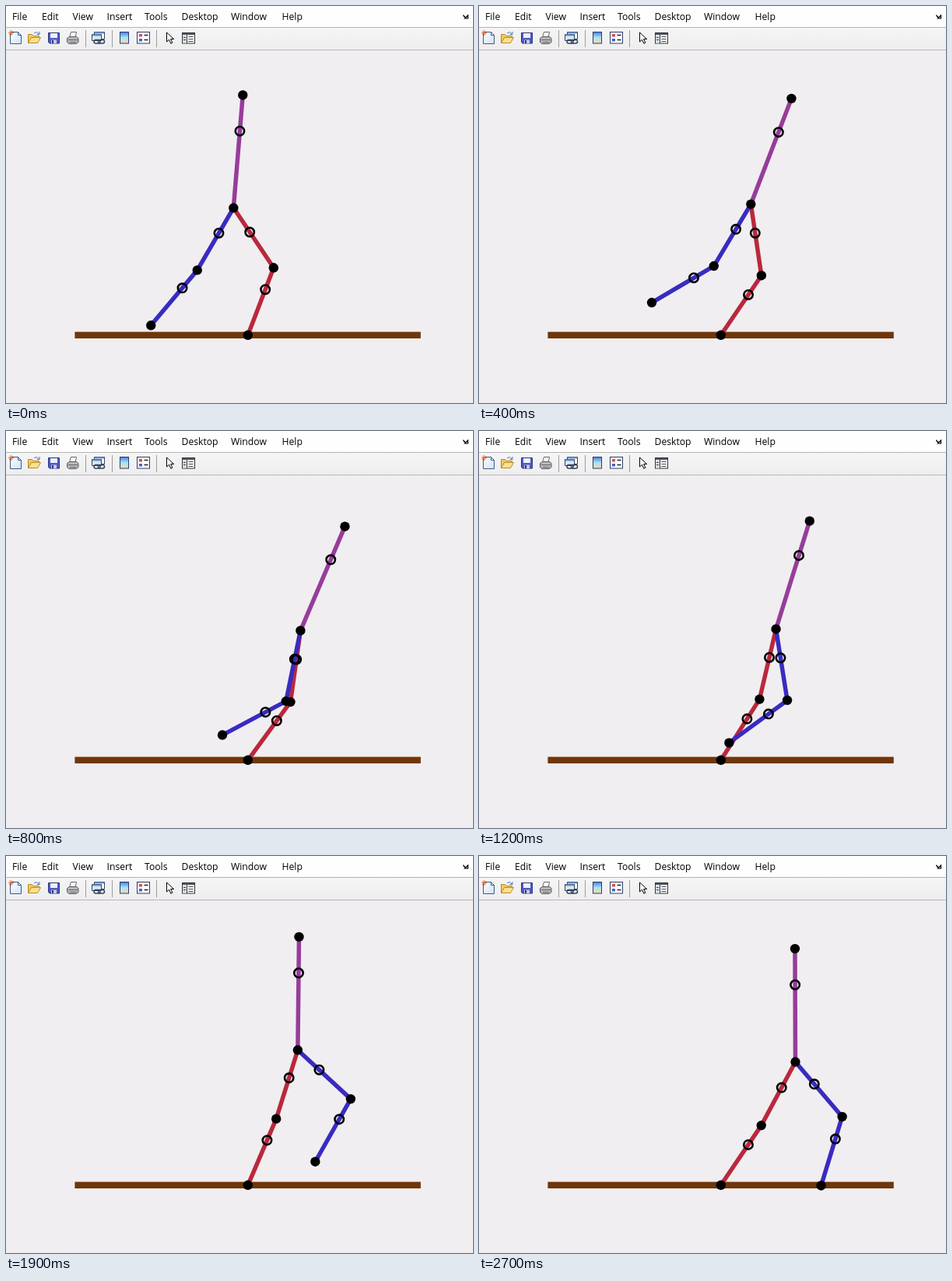
Write an HTML page that moves like this. It is 600x510 px and loops after 2.8 s.

```html
<!DOCTYPE html>
<html lang="en">
<head>
<meta charset="utf-8">
<title>Walking model</title>
<style>
html, body { margin: 0; width: 100%; height: 100%; overflow: hidden; background: #f0eef0; }
svg { display: block; width: 600px; height: 510px; }
text { font: 12.2px "Open Sans", "Noto Sans", sans-serif; fill: #000; }
</style>
</head>
<body>
<svg viewBox="0 0 600 510">
  <defs>
    <linearGradient id="page" x2="1" y2="1"><stop stop-color="#fff"/><stop offset="1" stop-color="#cfe2f5"/></linearGradient>
    <linearGradient id="bar" x2="0" y2="1"><stop stop-color="#4a7fe0"/><stop offset=".5" stop-color="#a9e4f5"/><stop offset="1" stop-color="#f5d8b0"/></linearGradient>
    <linearGradient id="strip" x2="0" y2="1"><stop stop-color="#f6f5f6"/><stop offset="1" stop-color="#efeeef"/></linearGradient>
  </defs>
  <rect width="600" height="510" fill="#f0eef0"/>
  <rect width="600" height="27" fill="#fefefe"/>
  <rect y="27" width="600" height="29" fill="url(#strip)"/>
  <path d="M0 27.500H600" stroke="#b4b3b4"/>
  <path d="M0 56.500H600" stroke="#b9b8b9"/>
  <g id="menu"></g>
  <path d="M587.500 11.500q1 3 4 3.500M593.500 12v4h-4z" fill="none" stroke="#000" stroke-width="1.200"/>

  <g id="tools" fill="none" stroke-width="1">
    <path d="M102.500 31v22M136.500 31v22M193.500 31v22" stroke="#9c9c9c"/>
    <path d="M5.500 33.500h10l4 4v11h-14z" fill="url(#page)" stroke="#3c5c84"/>
    <path d="M15.500 33.500v4h4" stroke="#3c5c84"/>
    <path d="M6.500 31v7M3 34.500h7M4 32l5 5M9 32l-5 5" stroke="#e8703a"/>
    <path d="M28.500 47.500v-11h5l2 2h7v3" fill="#f3c95b" stroke="#b58a2a"/>
    <path d="M28.500 47.500l4-7h12l-4 7z" fill="#fbe28c" stroke="#b58a2a"/>
    <path d="M36 35q4-3 6 1M43 33v3.500h-3.500" stroke="#4a78b8"/>
    <path d="M54.500 34.500h14v13.500h-12.500l-1.500-1.500z" fill="#5058c4" stroke="#2c347e"/>
    <path d="M57 35h9v6h-9z" fill="#eef1fb"/>
    <path d="M58 43.500h7v4.500h-7z" fill="#c8cce0"/>
    <path d="M59 44h2v4h-2z" fill="#2c347e"/>
    <path d="M81.500 40.500l2-7h7l-1.500 7z" fill="#fff" stroke="#666"/>
    <path d="M78.500 41.500l3-2h9l2.500 2v5l-3 2h-9l-2.500-2z" fill="#b8b8bc" stroke="#55555c"/>
    <path d="M80 43.500h12M82 46.500h8" stroke="#66666c"/>
    <path d="M113.500 33.500h13v9h-13z" fill="#fff" stroke="#34445c"/>
    <path d="M114 34.500h12" stroke="#6b93cc" stroke-width="2"/>
    <path d="M110.500 36.500h12v8h-12z" fill="#dce8f6" stroke="#34445c"/>
    <path d="M111 37.500h11" stroke="#6b93cc" stroke-width="2"/>
    <rect x="113" y="43.500" width="8" height="4.500" rx="2.200" stroke="#34445c" stroke-width="1.500"/>
    <rect x="118.500" y="43.500" width="8" height="4.500" rx="2.200" stroke="#34445c" stroke-width="1.500"/>
    <rect x="146.500" y="33.500" width="11" height="14.500" fill="url(#bar)" stroke="#2c3a68"/>
    <rect x="168.500" y="33.500" width="16" height="14.500" fill="#fff" stroke="#2c3a68"/>
    <path d="M171 36h4v3.500h-4z" fill="#d9534a"/>
    <path d="M171 42h4v3.500h-4z" fill="#4464c8"/>
    <path d="M177.500 37.500h5M177.500 43.500h5" stroke="#222" stroke-width="1.500"/>
    <path d="M206.500 34v12l3-2.800 2.300 5 2-1-2.200-4.700h4z" fill="#fff" stroke="#000"/>
    <rect x="226.500" y="34.500" width="16" height="13.500" fill="#fff" stroke="#333"/>
    <path d="M227 36h15" stroke="#4a5668" stroke-width="2"/>
    <path d="M227 37.500h5v10h-5z" fill="#d8dde4"/>
    <path d="M232.500 37v11" stroke="#333"/>
    <path d="M228 40.500h3M228 43.500h3M234.500 39.500h6M234.500 42.500h6M234.500 45.500h6" stroke="#444"/>
  </g>

  <rect x="88.400" y="418.600" width="444.400" height="8.400" fill="#703609"/>
  <g id="walker" stroke-width="5.500"></g>
</svg>
<script>
const LOOP = 2800, STEP = 100;
const LEG = 92.6, TORSO = 145.4, FOOT = [310.8, 422.8];
const RED = '#ba283d', BLUE = '#392bc0', PURPLE = '#973c9b';

// Joint angles in degrees from vertical at the key times (ms).
const times = [0, 400, 800, 1200, 1600, 2300, 2700];
const angles = {
  stanceShank: [20.9, 34.2, 36.2, 32.4, 26.4, 24.0, 34.1],
  stanceThigh: [-33.8, -8.4, 8.0, 13.2, 15.9, 20.7, 28.2],
  torso: [4.7, 21.0, 23.1, 17.3, 7.6, -4.2, -0.2],
  swingThigh: [-30.2, -30.9, -11.6, 9.0, 33.0, 53.8, 40.5],
  swingShank: [-40.0, -59.5, -62.0, -53.8, -40.1, -19.1, -17.0]
};

// Cubic spline with constant curvature in its end spans.
function spline(x, y) {
  const n = x.length - 1, m = x.map(() => 0);
  const h = i => x[i + 1] - x[i];
  const slope = i => (y[i + 1] - y[i]) / h(i);
  for (let pass = 0; pass < 80; pass++) {
    for (let i = 1; i < n; i++) {
      const r = 6 * (slope(i) - slope(i - 1));
      m[i] = (r - h(i - 1) * m[i - 1] - h(i) * m[i + 1]) / (2 * (h(i - 1) + h(i)));
    }
    m[0] = m[1];
    m[n] = m[n - 1];
  }
  return t => {
    let i = 0;
    while (i < n - 1 && t > x[i + 1]) i++;
    const d = h(i), b = (t - x[i]) / d, a = 1 - b;
    return a * y[i] + b * y[i + 1] +
      ((a ** 3 - a) * m[i] + (b ** 3 - b) * m[i + 1]) * d * d / 6;
  };
}

const curves = {};
for (const k in angles) curves[k] = spline(times, angles[k]);

function add(parent, tag, attrs) {
  const el = document.createElementNS('http://www.w3.org/2000/svg', tag);
  set(el, attrs);
  return parent.appendChild(el);
}
function set(el, attrs) {
  for (const k in attrs) el.setAttribute(k, attrs[k]);
}

const menu = document.getElementById('menu');
[['File', 8], ['Edit', 46], ['View', 85.5], ['Insert', 129.5], ['Tools', 178],
 ['Desktop', 225.5], ['Window', 289], ['Help', 354.5]].forEach(([label, x]) => {
  add(menu, 'text', { x, y: 18 }).textContent = label;
});

const walker = document.getElementById('walker');
const bones = [RED, RED, BLUE, BLUE, PURPLE].map(stroke => add(walker, 'line', { stroke }));
const rings = bones.map(() => add(walker, 'circle',
  { r: 5.7, fill: 'none', stroke: '#000', 'stroke-width': 2.6 }));
const dots = Array.from({ length: 6 }, () => add(walker, 'circle',
  { r: 6.2, fill: '#000', stroke: 'none' }));

function move([x, y], deg, len) {
  const a = deg * Math.PI / 180;
  return [x + len * Math.sin(a), y - len * Math.cos(a)];
}
const mix = (p, q, f) => [p[0] + (q[0] - p[0]) * f, p[1] + (q[1] - p[1]) * f];
const place = (el, [cx, cy]) => set(el, { cx, cy });

function draw(t) {
  const at = k => curves[k](t);
  const knee = move(FOOT, at('stanceShank'), LEG);
  const hip = move(knee, at('stanceThigh'), LEG);
  const head = move(hip, at('torso'), TORSO);
  const swingKnee = move(hip, 180 - at('swingThigh'), LEG);
  const swingFoot = move(swingKnee, 180 - at('swingShank'), LEG);

  // Each bone: upper end, lower end, centre of mass as a fraction.
  [[knee, FOOT, 0.323], [hip, knee, 0.405], [hip, swingKnee, 0.405],
   [swingKnee, swingFoot, 0.323], [head, hip, 0.319]].forEach(([p, q, f], i) => {
    set(bones[i], { x1: p[0], y1: p[1], x2: q[0], y2: q[1] });
    place(rings[i], mix(p, q, f));
  });
  [FOOT, knee, hip, head, swingKnee, swingFoot].forEach((p, i) => place(dots[i], p));
}

const start = performance.now();
function tick() {
  const t = (performance.now() - start) % LOOP;
  draw(Math.floor(t / STEP) * STEP);
  requestAnimationFrame(tick);
}
tick();
</script>
</body>
</html>
```
